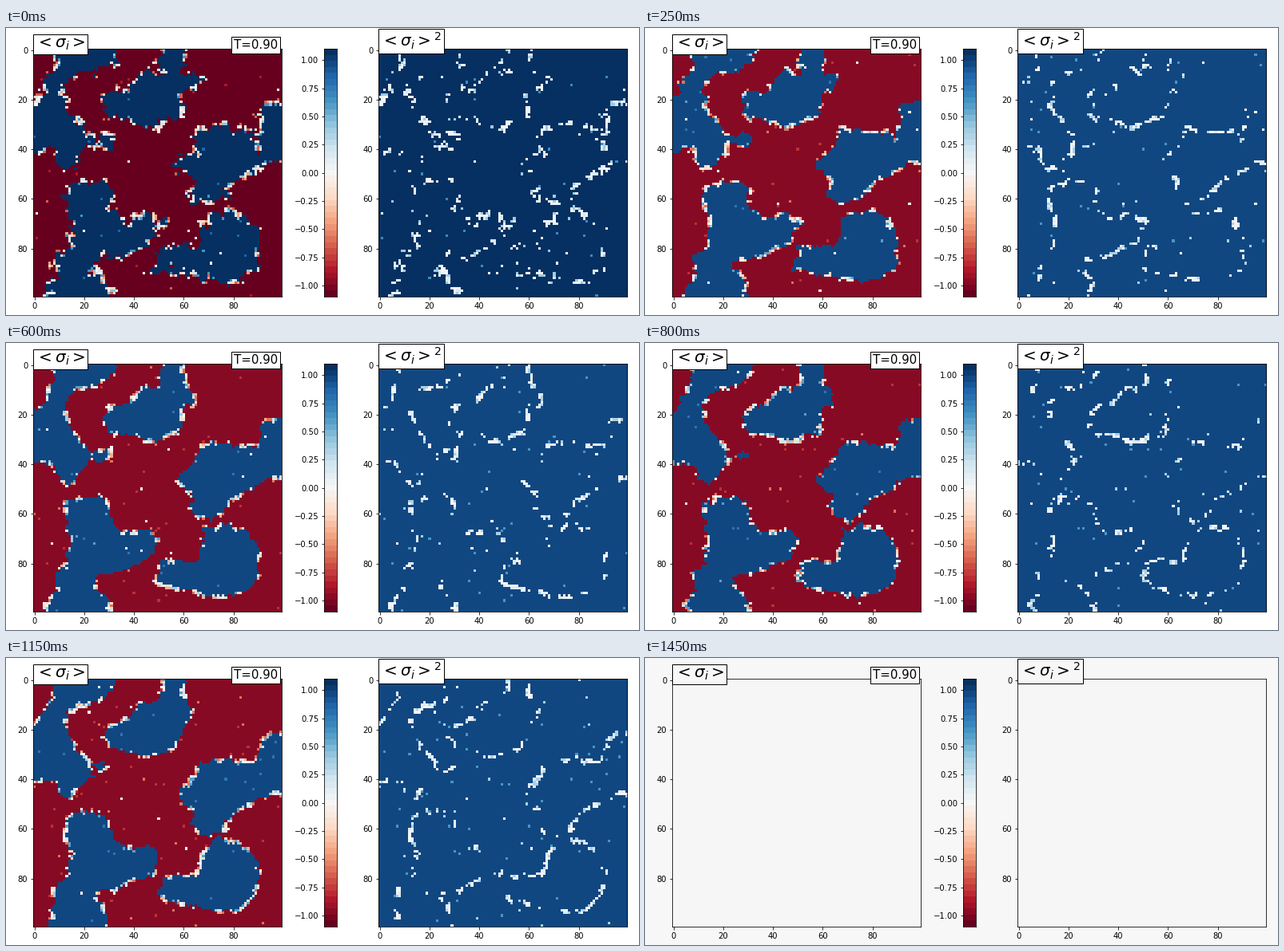
These frames come from a looping animation (792 px wide and 360 px high, 1.5 s). A matplotlib script:

```python
import numpy as np
import matplotlib.pyplot as plt
from matplotlib.animation import FuncAnimation

W, H, DPI = 792, 360, 72
N, FRAMES, STEP = 100, 30, 50
BLANK = "#f7f7f7"

gy, gx = np.mgrid[0:N, 0:N].astype(float)


def depth(*poly):
    """Signed distance of every site to a closed outline, positive inside."""
    near = np.full((N, N), 1e9)
    inside = np.zeros((N, N), bool)
    for (x1, y1), (x2, y2) in zip(poly, poly[1:] + poly[:1]):
        dx, dy = x2 - x1, y2 - y1
        t = np.clip(((gx - x1) * dx + (gy - y1) * dy) / (dx * dx + dy * dy), 0, 1)
        near = np.minimum(near, np.hypot(gx - x1 - t * dx, gy - y1 - t * dy))
        if dy:
            cross = x1 + (gy - y1) * dx / dy
            inside ^= ((y1 > gy) != (y2 > gy)) & (gx < cross)
    return np.where(inside, near, -near)


def neighbours(a):
    """Mean of the four nearest sites."""
    p = np.pad(a, 1, mode="edge")
    return (p[:-2, 1:-1] + p[2:, 1:-1] + p[1:-1, :-2] + p[1:-1, 2:]) / 4


def rough(seed):
    """Random field with short-range correlation."""
    n = np.random.default_rng(seed).normal(size=(N, N))
    for axis in (0, 1):
        n = (np.roll(n, 1, axis) + n + np.roll(n, -1, axis)) / 3
    return 2 * n


def drift(frame, span=5):
    """Roughness that wanders slowly from one random field to the next."""
    k, f = divmod(frame, span)
    return rough(k) * (1 - f / span) + rough(k + 1) * f / span


def start_field():
    top_left = depth(
        (6, -3), (8, 6), (3, 13), (3, 18), (-3, 22), (-3, 40), (9, 41), (11, 48),
        (17, 48), (22, 38), (30, 40), (30, 32), (21, 34), (14, 25), (12, 14),
        (17, 9), (27, 10), (27, 6), (32, 5), (32, -3))
    top = depth(
        (28, 27), (28, 18), (41, 15), (42, 10), (51, 9), (51, -3), (60, -3),
        (61, 8), (67, 12), (60, 18), (59, 27), (48, 31))
    right = depth(
        (65, 40), (66, 31), (87, 33), (90, 42), (91, 22), (103, 20), (103, 44),
        (86, 50), (78, 54), (77, 61), (62, 62), (66, 52), (55, 47))
    low_left = depth(
        (10, 58), (20, 53), (30, 53), (30, 63), (35, 69), (46, 66), (53, 69),
        (46, 78), (36, 83), (22, 85), (29, 93), (30, 103), (0, 103), (9, 92),
        (7, 84), (15, 79), (14, 69))
    low_right = depth(
        (67, 76), (68, 66), (80, 64), (91, 73), (90, 87), (78, 94), (62, 91),
        (49, 89), (52, 79), (61, 78), (64, 83))
    field = np.max([top_left, top, right, low_left, low_right], axis=0)
    return np.clip(field, -5, 5) + 1.5 * rough(50)


def mean_spin(field, frame):
    """Ordered domains with patchy walls and a few thermal flips."""
    rng = np.random.default_rng(100 + frame)
    s = np.where(field + 0.8 * drift(frame) > 0, 1.0, -1.0)
    wall = (s * neighbours(s) < 1) & (rough(200 + frame) > 0.3)
    flips = rng.random((N, N)) < 0.006
    m = np.where(flips, s * rng.choice([0.8, 0.8, 0.8, 0.6, 0], (N, N)), s)
    return np.where(wall, s * rng.integers(-1, 4, (N, N)) / 5, m)


# Domains coarsen as their field diffuses; the last step is empty.
spins = []
field = start_field()
for k in range(FRAMES - 1):
    spins.append(mean_spin(field, k))
    field += 0.8 * (neighbours(field) - field)
spins.append(np.zeros((N, N)))

fig = plt.figure(figsize=(W / DPI, H / DPI), dpi=DPI, facecolor="white")
TOP, SIDE = 26.2, 311


def panel(left, width):
    return fig.add_axes([left / W, 1 - (TOP + SIDE) / H, width / W, SIDE / H])


def grid(left):
    ax = panel(left, SIDE)
    im = ax.imshow(np.zeros((N, N)), cmap="RdBu", vmin=-1.1, vmax=1.1,
                   interpolation="nearest", aspect="auto")
    ax.set_xticks(range(0, N, 20))
    ax.set_yticks(range(0, N, 20))
    return im


def label(x, y, text, size, ha="left"):
    return fig.text(x / W, 1 - y / H, text, fontsize=size, ha=ha, va="bottom",
                    bbox=dict(facecolor="white", edgecolor="black", pad=3))


spin_im, square_im = grid(34.2), grid(466.2)

bar = panel(398.2, 16)
bands = np.linspace(-1.1, 1.1, 41)[:, None]
bar.imshow(bands, cmap="RdBu", vmin=-1.1, vmax=1.1, origin="lower", aspect="auto",
           extent=(0, 1, -1.1, 1.1), interpolation="nearest")
bar.set_xticks([])
bar.set_yticks(np.arange(-4, 5) / 4)

labels = [label(37.2, 30, r"$<\sigma_i>$", 20),
          label(340, 28.5, "T=0.90", 15, "right"),
          label(469.2, 29, r"$<\sigma_i>^2$", 20)]


def draw(frame):
    m = spins[frame]
    limit = 1.0 if frame == 0 else 1.1
    for im, data in ((spin_im, m), (square_im, m * m)):
        im.set_data(data)
        im.set_clim(-limit, limit)
    paper = BLANK if frame == FRAMES - 1 else "white"
    fig.set_facecolor(paper)
    for text in labels:
        text.get_bbox_patch().set_facecolor(paper)
    return [spin_im, square_im, *labels]


anim = FuncAnimation(fig, draw, frames=FRAMES, interval=STEP, repeat=True,
                     repeat_delay=0, blit=False)
plt.show()
```
